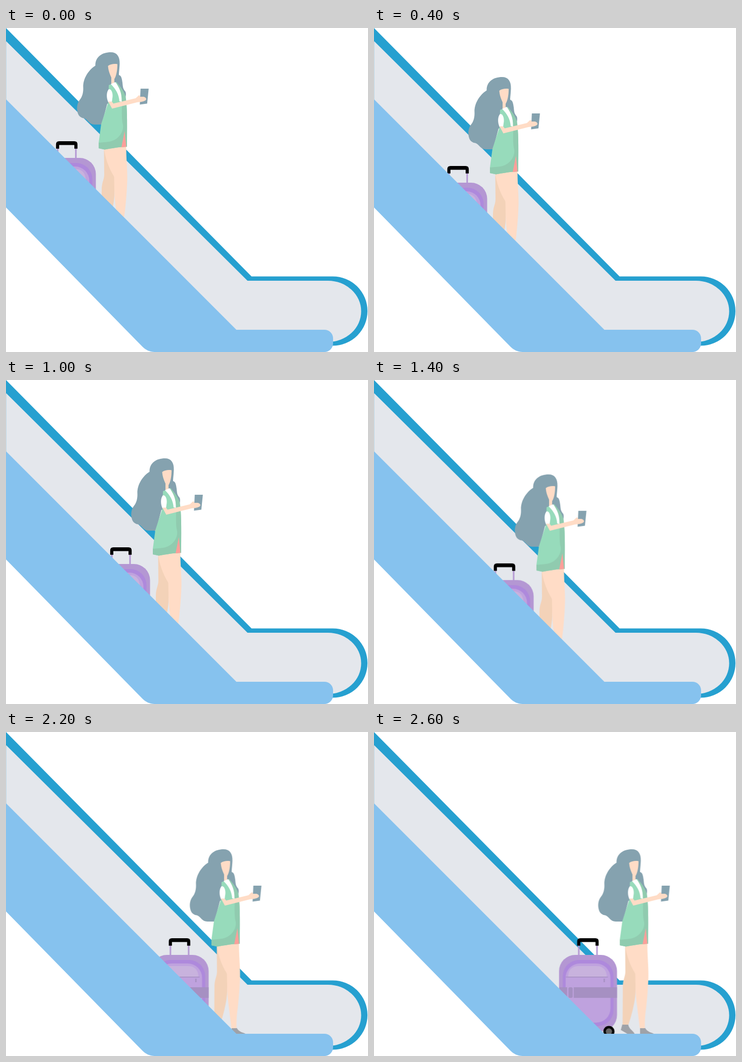
Animation, 715 px wide and 641 px high, one loop 2.7 s. Source, as an HTML page:

```html
<!DOCTYPE html>
<html lang="en">
<head>
<meta charset="utf-8">
<title>Escalator</title>
<style>
  html, body { margin: 0; width: 100%; height: 100%; overflow: hidden; background: #fff; }
  svg { display: block; width: 715px; height: 641px; }
  .rail { fill: #26a0d0; }
  .glass { fill: #e4e7ec; }
  .front { fill: #86c2ee; }
  .hair { fill: #85a2af; }
  .skin { fill: #ffdcc6; }
  .shade { fill: #f3d2b8; }
  .vest { fill: #97dbbb; }
  .fold { fill: #90cbaf; }
  .slit { fill: #fc9f9a; }
  .white { fill: #fff; }
  .shoe { fill: #9fa2a8; }
  .case { fill: #b497d3; }
  .rim { fill: #ae89dc; }
  .panel { fill: #bfa2de; }
  .pocket { fill: #c8b2dd; }
  .strap { fill: #a690c2; }
</style>
</head>
<body>
<svg viewBox="0 0 715 641">
  <path class="rail" d="M0 0L485 491.5H645.5A68.5 68.5 0 0 1 645.5 628.5H600L455 605L0 150Z"/>
  <path class="glass" d="M.2 26L477 500H636A65.5 60.5 0 0 1 636 621H600L455 605L.2 150Z"/>

  <g id="rider">
    <!-- suitcase and shoes, laid out at the landing -->
    <g transform="translate(-302.5 -184)">
      <path class="case" d="M403 418h3v25h-3zM439 418h3v25h-3z"/>
      <path d="M401.3 422.7V414Q401.3 408 407.5 408H437.5Q443.7 408 443.7 414V422.7H437.5V415.5H407.5V422.7Z"/>
      <rect class="case" x="365.5" y="441" width="114.5" height="151" rx="32"/>
      <rect class="rim" x="373" y="451" width="100" height="131" rx="32"/>
      <rect class="panel" x="378.5" y="458" width="88.5" height="117" rx="28"/>
      <path class="pocket" d="M383.5 484C384 469 392 463 405 463H439C452 463 459 470 460 484Z"/>
      <path class="strap" d="M379 484h83v1.5h-83zM453.5 488h2.5v7h-2.5zM365.5 505H480v21H365.5z"/>
      <rect class="panel" x="381.5" y="500.5" width="13" height="29" rx="4"/>
      <rect class="strap" x="384" y="505" width="8.5" height="21" rx="3"/>
      <circle cx="464" cy="592.5" r="11"/>
      <circle cx="464" cy="592.5" r="6.2" fill="#666"/>
      <path class="shoe" d="M490.5 578.5H502C504 589 513 591 515 598H502L487.5 589.5ZM525.5 585.5H535.5C540 594 548 594 553.5 597.5H525.5Z"/>
    </g>

    <path class="hair" d="M176.5 74.500C176 57 190 48 207 48C219 48 225 56 224.500 71C224 82 223 88 223 93C228 94 229 101 230 108C231 118 231 120 236 126C238 131 236 138 235 145L200 150L189 191H175C164 191 162 181 154 178.500C149 178 144 175 142 169C139 160 140 150 145 143C151 136 153 127 152.500 117C152 100 163 83 176.500 74.500Z"/>
    <path class="shade" d="M193.5 238L194 290C194 300 189 305 189 320L188.5 395H200C207 376 214 345 214 330V295L207 238Z"/>
    <path class="skin" d="M193.5 238C196 257 202 275 213.5 294C214 305 213.5 325 215.5 345L222.5 402H232.5C232.5 395 232 380 235 362C238 335 239 315 239.5 300C240 280 237 255 237.5 234Z"/>
    <path class="skin" d="M201.5 75C207 71 214 70.5 220 71.5C220 80 219 90 216 97L214 101V111L208 113V98C205 91 202 84 201.5 75Z"/>

    <path class="vest" d="M203 113L218 107C228 118 236 130 237 141C240 165 239 200 239 235C225 235 210 238 195 240.5L183 238V227L188 190L202 147Z"/>
    <path class="fold" d="M218 107C228 118 236 130 237 141C240 165 239 200 239 235C225 235 210 238 195 240.5L183 238V227L199 225.5C222 224 233 205 231 192C228 180 229 165 229 145Z"/>
    <path class="slit" d="M234.3 204L228 236L237.5 235Z"/>
    <path class="white" d="M207 111L216 107C224 118 229 128 228.5 146L224 145C223 131 217 121 207 111Z"/>
    <path class="white" d="M203 121C209 121 211 129 210.5 136L209 147H202C198 138 198 127 203 121Z"/>

    <path class="hair" d="M265.8 120H281.8L278.8 149.5L264.300 151.500Z"/>
    <path class="skin" d="M202 145.5H209L212 149.5L256 139L262 133.5C264 133 265 134 265 136H272C278 138 278.5 142 274 144C268 147 263 146 259 147L209.5 159.5Z"/>
  </g>

  <path class="front" d="M0 141L455 597H629A17 17 0 0 1 646 614V624A17 17 0 0 1 629 641H294C284 641 276 637 269 630L0 355Z"/>
</svg>
<script>
  const TICK = 100, LOOP = 2700;
  const skipped = [600, 1100, 1500];
  // Waypoints down the slope and along the landing: step, x, y
  const way = [[0, 0, 0], [4, 46, 49], [9, 107, 107], [12, 137.8, 138.8],
               [16, 184.5, 184], [23, 302.5, 184]];

  function place(step) {
    const i = Math.max(1, way.findIndex(([s]) => s >= step));
    const [s0, x0, y0] = way[i - 1], [s1, x1, y1] = way[i];
    let k = (step - s0) / (s1 - s0);
    // she speeds up on the landing
    if (i === way.length - 1) k = Math.pow(k, 1.33);
    return `translate(${x0 + (x1 - x0) * k}px, ${y0 + (y1 - y0) * k}px)`;
  }

  const times = Array.from({ length: LOOP / TICK }, (_, i) => i * TICK)
    .filter(t => !skipped.includes(t));
  const frames = times.map((t, step) => ({
    offset: t / LOOP, transform: place(step), easing: 'steps(1, end)'
  }));
  frames.push({ offset: 1, transform: place(times.length - 1) });
  document.getElementById('rider').animate(frames, { duration: LOOP, iterations: Infinity });
</script>
</body>
</html>
```
